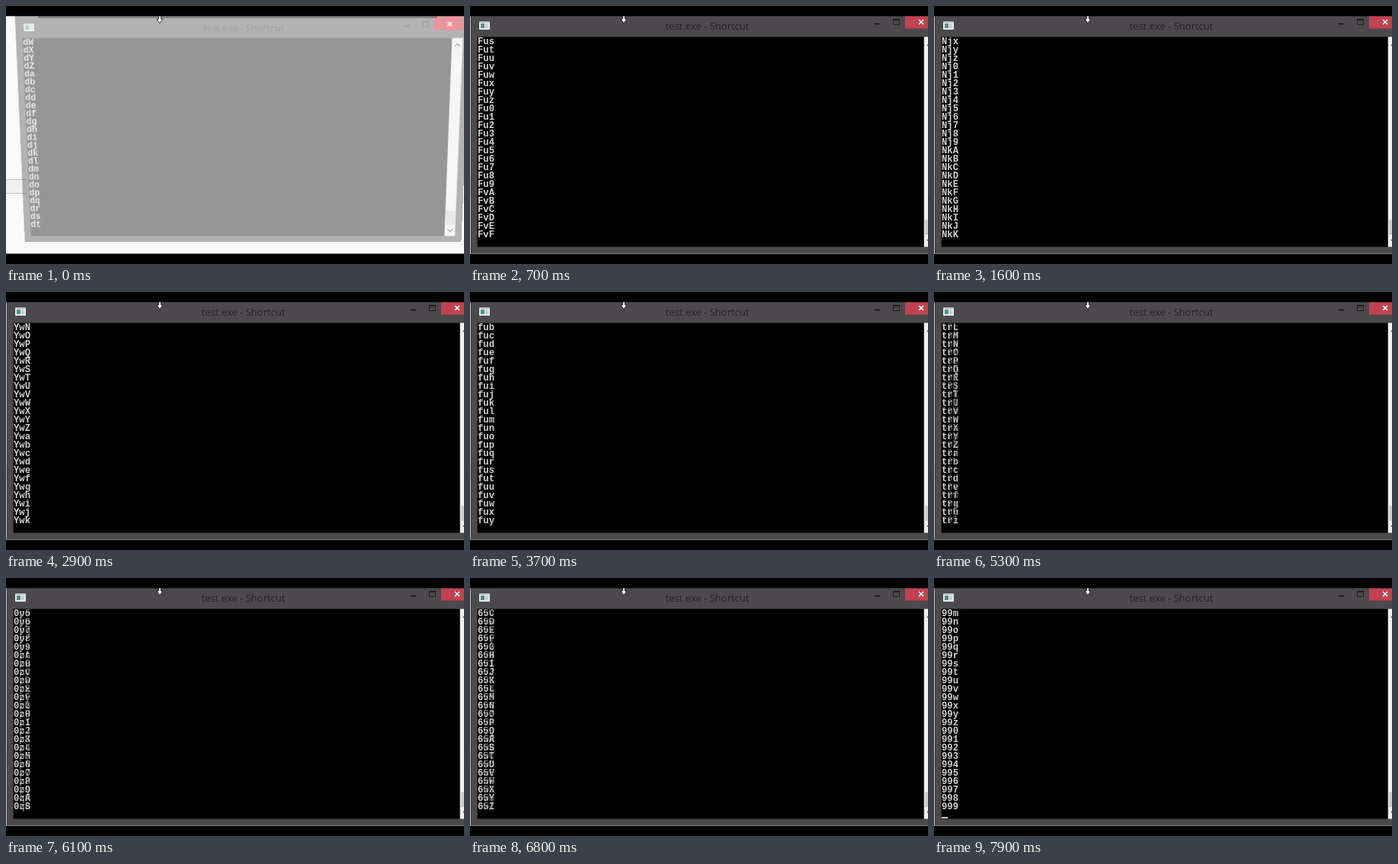
Recreate the animation shown at these times as an HTML page with a canvas. Size 600 px wide and 338 px high, loop 8000 ms.

```html
<!DOCTYPE html>
<html lang="en">
<head>
<meta charset="utf-8">
<title>Console counter</title>
<style>
  html, body { margin: 0; width: 100%; height: 100%; overflow: hidden; background: #000; }
  canvas { display: block; }
</style>
</head>
<body>
<canvas id="stage" width="600" height="338"></canvas>
<script>
const LOOP = 8000, STEP = 100, OPENING = 300;
const ROWS = 24, LINE = 11, WIN_TOP = 9, WIN_WIDTH = 619, WIN_HEIGHT = 315;
const DIGITS = 'ABCDEFGHIJKLMNOPQRSTUVWXYZabcdefghijklmnopqrstuvwxyz0123456789';
const LAST = 62 ** 3 - 1;

// [time, number of the newest line]; negative numbers are two-letter words
const PACE = [[0, -2001], [700, 22139], [1600, 52214], [2900, 95268],
              [4400, 145515], [6100, 202493], [7170, LAST]];

const ctx = document.getElementById('stage').getContext('2d');
const windowCanvas = document.createElement('canvas');
windowCanvas.width = WIN_WIDTH;
windowCanvas.height = WIN_HEIGHT;
const win = windowCanvas.getContext('2d');
win.translate(0, -WIN_TOP);

const lerp = (a, b, p) => a + (b - a) * p;
const clamp = v => Math.max(0, Math.min(1, v));

function box(c, color, x, y, w, h) {
  c.fillStyle = color;
  c.fillRect(x, y, w, h);
}

function stroke(c, color, width, ...lines) {
  c.strokeStyle = color;
  c.lineWidth = width;
  c.beginPath();
  for (const line of lines) line.forEach(([x, y], i) => i ? c.lineTo(x, y) : c.moveTo(x, y));
  c.stroke();
}

function word(n) {
  const length = n < 0 ? 2 : 3;
  if (n < 0) n += 62 ** 2;
  let text = '';
  for (let i = 0; i < length; i++) {
    text = DIGITS[n % 62] + text;
    n = Math.floor(n / 62);
  }
  return text;
}

function newestLine(t) {
  if (t >= PACE.at(-1)[0]) return LAST;
  const i = PACE.findIndex(([time]) => time > t);
  const [t0, n0] = PACE[i - 1], [t1, n1] = PACE[i];
  return Math.round(lerp(n0, n1, (t - t0) / (t1 - t0)));
}

function drawLines(newest, alpha) {
  win.globalAlpha = alpha;
  for (let i = 0; i < ROWS; i++) {
    win.fillText(word(newest - ROWS + 1 + i), 10, 49.8 + i * LINE);
  }
  win.globalAlpha = 1;
}

function drawConsole(t) {
  box(win, '#000', 9.6, 40.5, 585, 275);
  win.font = 'bold 12.2px "Liberation Mono", monospace';
  win.fillStyle = '#d2d2d2';
  const newest = newestLine(t);
  // Screen refreshes drift until two of them show in one picture
  const ghost = newest < LAST ? clamp((t - 3600) / 5000) : 0;
  win.globalCompositeOperation = 'lighter';
  drawLines(newest, 1 - ghost);
  if (ghost) drawLines(Math.min(LAST, newest + 575), ghost);
  win.globalCompositeOperation = 'source-over';
  if (t >= 7900) box(win, '#ccc', 10, 313, 8, 2);
}

function drawWindow(t, opened) {
  win.clearRect(0, WIN_TOP, WIN_WIDTH, WIN_HEIGHT);
  box(win, '#4c494c', 0.7, WIN_TOP, WIN_WIDTH, WIN_HEIGHT);
  box(win, '#3b393b', 1, WIN_TOP, 1, WIN_HEIGHT);

  box(win, '#e8e8e8', 12, 20, 14, 11);
  box(win, '#b9bcbc', 12, 20, 14, 2);
  box(win, '#4f9487', 14, 23, 5, 6);
  box(win, '#c9d2d0', 20, 23, 4, 6);

  win.font = '13px "Open Sans", "Noto Sans", sans-serif';
  win.fillStyle = '#252325';
  win.fillText('test.exe - Shortcut', 256, 30.5);

  box(win, '#201e20', 530, 22.5, 7, 2);
  win.strokeStyle = '#201e20';
  win.lineWidth = 1;
  win.strokeRect(554.5, 17.5, 8, 7);
  box(win, '#201e20', 554, 17, 9, 2);
  box(win, opened < 1 ? '#d00010' : '#c2424f', 570, WIN_TOP, 42, 20.6);
  stroke(win, '#fff', 1.6, [[588, 18], [594, 24]], [[594, 18], [588, 24]]);

  box(win, '#f0f0f0', 594.6, 40.5, 15, 275);
  box(win, '#cdcdcd', 596, 280, 13, 20);
  stroke(win, '#505050', 1.6, [[599, 52], [602.5, 48.5], [606, 52]],
                              [[599, 306], [602.5, 309.5], [606, 306]]);
  drawConsole(t);
}

// Draws the window tilted back, one pixel row at a time
function drawTilted(opened) {
  const top = lerp(41.5, 40, opened), scaleY = lerp(0.943, 1, opened);
  ctx.globalAlpha = lerp(0.4, 1, opened);
  for (let y = 13; y < 325; y++) {
    const sourceY = 40 + (y - top) / scaleY - WIN_TOP;
    if (sourceY < 0 || sourceY >= WIN_HEIGHT - 1) continue;
    const depth = (y - 43) / 258;
    const scaleX = lerp(lerp(0.9615, 0.9256, depth), 1, opened);
    const left = lerp(22 + 11 * depth, 10, opened) - 10 * scaleX;
    ctx.drawImage(windowCanvas, 0, sourceY, WIN_WIDTH, 1, left, y, WIN_WIDTH * scaleX, 1);
  }
  ctx.globalAlpha = 1;
}

function drawPage() {
  box(ctx, '#fbfafb', 0, 13, 600, 312);
  box(ctx, '#c8c8c8', 0, 227, 27, 19);
  box(ctx, '#f1f1f1', 0, 228, 27, 17);
  box(ctx, '#b0b0b0', 42, 13, 523, 3);
  for (const y of [67, 90, 242]) box(ctx, '#fff', 40, y, 535, 1);
}

function drawPointer() {
  ctx.beginPath();
  [[200, 10], [203, 10], [203, 17], [205.5, 17], [201.5, 22.5], [197.5, 17], [200, 17]]
    .forEach(([x, y]) => ctx.lineTo(x, y));
  ctx.closePath();
  ctx.fillStyle = '#fff';
  ctx.fill();
  ctx.strokeStyle = '#000';
  ctx.lineWidth = 0.8;
  ctx.stroke();
}

function draw(t) {
  const opened = 1 - (1 - clamp(t / OPENING)) ** 3;
  drawPage();
  drawWindow(t, opened);
  if (opened < 1) drawTilted(opened);
  else ctx.drawImage(windowCanvas, 0, WIN_TOP);
  drawPointer();
  box(ctx, '#000', 0, 0, 600, 13.3);
  box(ctx, '#000', 0, 324.5, 600, 13.5);
}

const start = performance.now();
function tick() {
  const t = (performance.now() - start) % LOOP;
  draw(Math.floor(t / STEP) * STEP);
  requestAnimationFrame(tick);
}
tick();
</script>
</body>
</html>
```
